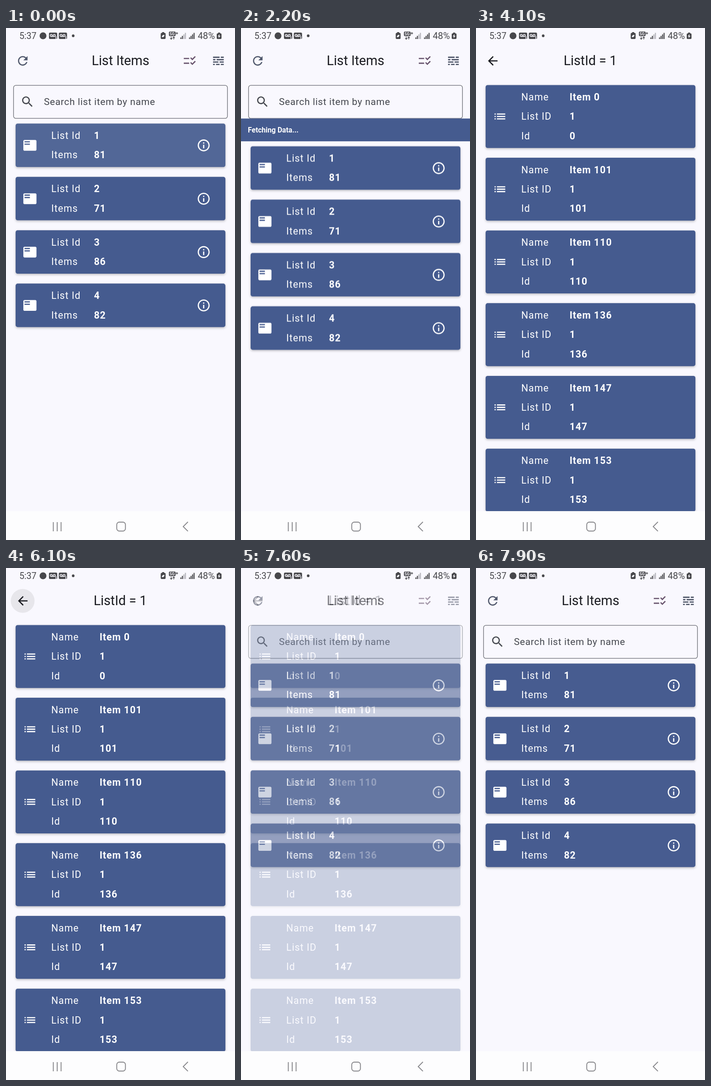
An HTML page for the animation above (8000 ms loop, 501 by 1117 pixels).

```html
<!DOCTYPE html>
<html lang="en">
<head>
<meta charset="utf-8">
<title>List Items</title>
<style>
  html, body { margin: 0; width: 100%; height: 100%; overflow: hidden; background: #f9f8fe; }
  svg { display: block; width: 100vw; height: 100vh; }
  text { font-family: Roboto, sans-serif; white-space: pre; }
  .title { font-size: 28.7px; fill: #1a1b20; text-anchor: middle; }
  .hint { font-size: 20.9px; letter-spacing: .65px; fill: #44474e; }
  .row { font-size: 21.2px; letter-spacing: 1px; fill: #fff; }
  .bold { font-weight: 700; }
  .card { fill: #455b8f; filter: drop-shadow(0 2.5px 2.5px rgba(0, 0, 0, .25)); }
  .status { fill: #47474b; }
  .nav { fill: none; stroke: #86868a; stroke-width: 1.9; }

  #list, #detail, #cards, #bar, #press, #back { animation: 8s step-end infinite; }
  #list { animation-name: list; }
  #detail { animation-name: detail; }
  #cards { animation-name: shift; }
  #bar { animation-name: bar; }
  #press { animation-name: press; }
  #back { animation-name: back; }

  @keyframes list {
    0% { opacity: 1; } 28.75% { opacity: .255; } 30% { opacity: 0; }
    95% { opacity: .76; } 96.25% { opacity: .93; } 97.5% { opacity: .98; } 98.75%, 100% { opacity: .99; }
  }
  @keyframes detail {
    0% { opacity: 0; } 28.75% { opacity: .745; } 30% { opacity: 1; }
    95% { opacity: .255; } 96.25% { opacity: .07; } 97.5% { opacity: .02; } 98.75%, 100% { opacity: 0; }
  }
  @keyframes shift {
    0% { transform: none; } 27.5% { transform: translateY(49.6px); } 30%, 100% { transform: none; }
  }
  @keyframes bar {
    0% { opacity: 0; } 27.5% { opacity: 1; } 30%, 100% { opacity: 0; }
  }
  @keyframes press {
    0% { opacity: .075; } 1.25% { opacity: .085; } 11.25% { opacity: .093; }
    17.5% { opacity: .1; } 25%, 100% { opacity: 0; }
  }
  @keyframes back {
    0% { opacity: 0; } 56.25% { opacity: 1; } 92.5%, 100% { opacity: 0; }
  }
</style>
</head>
<body>
<svg viewBox="0 0 501 1117" preserveAspectRatio="none">
  <defs>
    <path id="info" d="M11 7h2v2h-2zm0 4h2v6h-2zm1-9C6.48 2 2 6.48 2 12s4.48 10 10 10 10-4.48 10-10S17.52 2 12 2zm0 18c-4.41 0-8-3.59-8-8s3.59-8 8-8 8 3.59 8 8-3.59 8-8 8z"/>
    <path id="board" d="M21 3H3c-1.1 0-2 .9-2 2v14c0 1.1.9 2 2 2h18c1.1 0 2-.9 2-2V5c0-1.1-.9-2-2-2zm-9 8H3V9h9v2zm0-4H3V5h9v2z"/>
    <path id="lines" d="M3 13h2v-2H3zm0 4h2v-2H3zm0-8h2V7H3zm4 4h14v-2H7zm0 4h14v-2H7zM7 7v2h14V7z"/>
    <path id="arrow" d="M20 11H7.83l5.59-5.59L12 4l-8 8 8 8 1.41-1.41L7.83 13H20z"/>
    <path id="refresh" d="M17.65 6.35C16.2 4.9 14.21 4 12 4c-4.42 0-7.99 3.58-7.99 8s3.57 8 7.99 8c3.73 0 6.84-2.55 7.73-6h-2.08c-.82 2.33-3.04 4-5.65 4-3.31 0-6-2.69-6-6s2.69-6 6-6c1.66 0 3.14.69 4.22 1.78L13 11h7V4z"/>
    <path id="search" d="M15.5 14h-.79l-.28-.27C15.41 12.59 16 11.11 16 9.5 16 5.91 13.09 3 9.5 3S3 5.91 3 9.5 5.91 16 9.5 16c1.61 0 3.09-.59 4.23-1.57l.27.28v.79l5 4.99L20.49 19zm-6 0C7.01 14 5 11.99 5 9.5S7.01 5 9.5 5 14 7.01 14 9.5 11.99 14 9.5 14z"/>
    <path id="checks" d="M11 7H2v2h9zm0 8H2v2h9zm5.34-4l-3.54-3.54 1.41-1.41 2.12 2.12 4.24-4.24L22 5.34zm0 8l-3.54-3.54 1.41-1.41 2.12 2.12 4.24-4.24L22 13.34z"/>
    <path id="dashes" d="M3 5h11v2H3zm13 0h5v2h-5zM3 9h4v2H3zm6 0h12v2H9zM3 13h9v2H3zm11 0h7v2h-7zM3 17h3v2H3zm5 0h6v2H8zm8 0h5v2h-5z"/>
    <g id="mail">
      <rect width="18" height="14" rx="2.5"/>
      <g fill="none" stroke="#f9f8fe" stroke-width="1.5">
        <circle cx="5" cy="6.3" r="2.2"/><circle cx="11.6" cy="6.3" r="2.2"/>
        <path d="M5 8.5h6.6M15.4 8v6"/>
      </g>
    </g>
  </defs>

  <rect width="501" height="1117" fill="#f9f8fe"/>

  <g id="list">
    <rect y="40" width="501" height="1014" fill="#f9f8fe"/>
    <g id="listHead"></g>
    <text class="title" x="250.5" y="81.3">List Items</text>
    <rect x="16.5" y="125.2" width="468" height="72" rx="5" fill="none" stroke="#686a72" stroke-width="1.3"/>
    <text class="hint" x="83" y="167.8">Search list item by name</text>
    <g id="bar">
      <rect y="197.5" width="501" height="49.7" fill="#455b8f"/>
      <text class="bold" x="15" y="228" font-size="15.66" fill="#fff">Fetching Data...</text>
    </g>
    <g id="cards"></g>
  </g>

  <g id="detail">
    <rect y="40" width="501" height="1014" fill="#f9f8fe"/>
    <circle id="back" cx="36.5" cy="71.7" r="26" fill="#e7e6eb"/>
    <g id="detailHead"></g>
    <text class="title" x="250" y="81.3">ListId = 1</text>
    <g id="items"></g>
  </g>

  <g class="status">
    <text x="29.2" y="23.6" font-size="19.4">5:37</text>
    <circle cx="81" cy="17" r="7.5"/>
    <use href="#mail" x="94" y="10"/>
    <use href="#mail" x="115.5" y="10"/>
    <circle cx="147" cy="17" r="2.9"/>
    <path d="M341.5 9h4.5v1.8h1.2a2 2 0 0 1 2 2v9.2a2 2 0 0 1-2 2h-6.7a2 2 0 0 1-2-2v-9.2a2 2 0 0 1 2-2h1z"/>
    <path d="M341 20.5c0-4 2-5.5 5.5-5.7.2 3.800-1.500 5.700-4.500 5z" fill="#f9f8fe"/>
    <rect x="356.500" y="7.800" width="14.500" height="10" rx="2"/>
    <text class="bold" x="358" y="16" font-size="8.800" fill="#f9f8fe">5G</text>
    <path d="M373.800 9v5M371.300 11.500h5M361.500 19v5.500m-2.300-2.300 2.300 2.300 2.300-2.300M367 25v-5.500m-2.300 2.300 2.300-2.300 2.300 2.300" fill="none" stroke="#47474b" stroke-width="1.300"/>
    <g id="bars"></g>
    <text x="419.500" y="23.600" font-size="20.200">48%</text>
    <path d="M464 10h4.500v1.800h1a2 2 0 0 1 2 2v8.200a2 2 0 0 1-2 2h-6.500a2 2 0 0 1-2-2v-8.200a2 2 0 0 1 2-2h1z"/>
    <path d="M467.300 13l-4 5.500h2.400l-.6 4 4-5.500h-2.400z" fill="#f9f8fe"/>
  </g>

  <rect y="1054" width="501" height="63" fill="#fdfdfe"/>
  <g class="nav">
    <path d="M103.500 1078v20M112 1078v20M120.500 1078v20M398 1077.500l-10.300 10.200 10.300 10.200"/>
    <rect x="242.300" y="1078" width="19" height="19.500" rx="5.500"/>
  </g>
</svg>
<script>
  const fill = (id, html) => { document.getElementById(id).innerHTML = html; };
  const icon = (name, x, y, color = '#fff') =>
    `<use href="#${name}" fill="${color}" transform="translate(${x} ${y}) scale(1.3047) translate(-12 -12)"/>`;
  const row = (y, label, x, value) =>
    `<text class="row" x="99" y="${y}">${label}</text><text class="row bold" x="${x}" y="${y}">${value}</text>`;
  const box = (h, attrs = 'class="card"') =>
    `<rect ${attrs} x="21" width="459" height="${h}" rx="4.500"/>`;
  const stack = (list, top, pitch, draw) =>
    list.map((v, i) => `<g transform="translate(0 ${top + i * pitch})">${draw(v, i)}</g>`).join('');

  fill('listHead',
    icon('refresh', 36.7, 71.7, '#50586c') + icon('checks', 402, 71.7, '#66516b') +
    icon('dashes', 464.7, 71.7, '#454d60') + icon('search', 47, 161, '#44474e'));
  fill('detailHead', icon('arrow', 36.7, 71.7, '#1a1b20'));

  fill('cards', stack([81, 71, 86, 82], 208.4, 116.4, (count, i) =>
    box(94.8) + (i ? '' : box(94.8, 'id="press" fill="#fff"')) +
    icon('board', 52.3, 47.7) + icon('info', 432.5, 47.7) +
    row(33.7, 'List Id', 192.4, i + 1) + row(76, 'Items', 192.4, count)));

  fill('items', stack([0, 101, 110, 136, 147, 153], 124.4, 158.65, id =>
    box(137.3) + icon('lines', 52.3, 68.6) +
    row(33.7, 'Name', 204.7, 'Item ' + id) + row(76, 'List ID', 204.7, 1) + row(118.2, 'Id', 204.7, id)));

  const bars = (x, lit) => [0, 1, 2, 3].map(i =>
    `<rect x="${x + i * 3.3}" y="${20.5 - i * 3.3}" width="2.200" height="${3.5 + i * 3.3}" opacity="${i < lit ? 1 : .4}"/>`).join('');
  fill('bars', bars(381.5, 2) + bars(400.5, 4));
</script>
</body>
</html>
```
